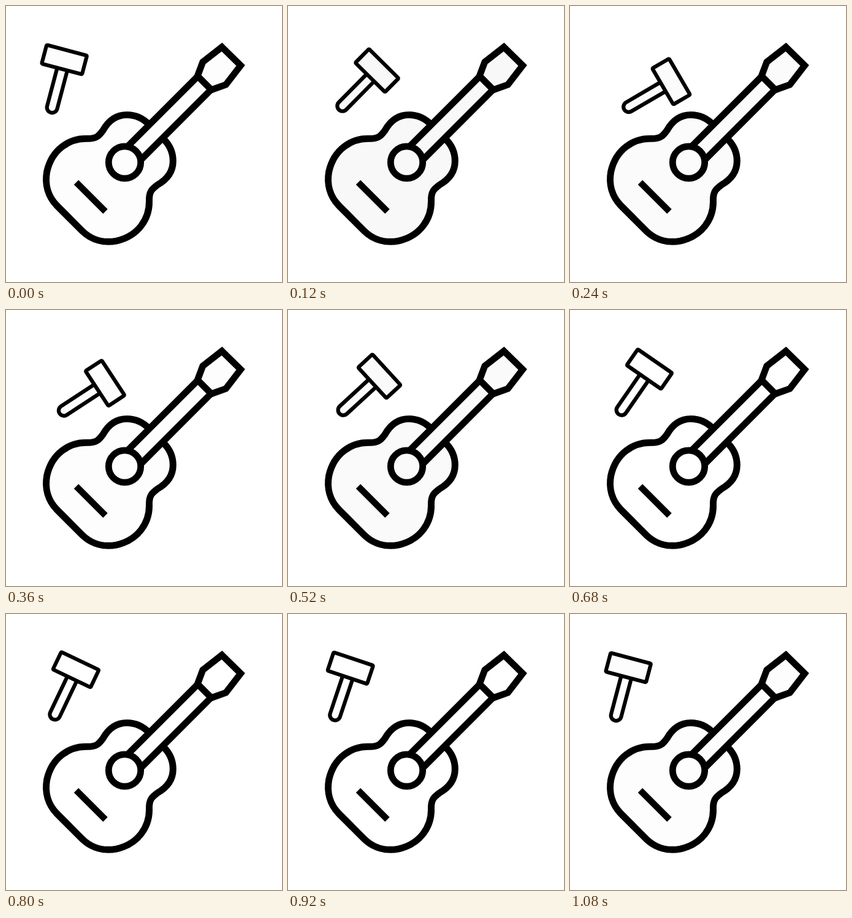
Recreate the animation shown at these times as an HTML page. Size 450x450 px, loop 1120 ms.

```html
<!DOCTYPE html>
<html lang="en">
<head>
<meta charset="utf-8">
<title>Guitar and hammer</title>
<style>
  html, body { margin: 0; width: 100%; height: 100%; overflow: hidden; background: #fff; }
  svg { display: block; width: 100vw; height: 100vh; }
</style>
</head>
<body>
<svg viewBox="0 0 450 450">
  <defs>
    <path id="side" d="M104 346.5L83 325.5C68 310 63 290 66.7 270C75 233 104 216 131 216.3
      C148 217 152 211 158 203C167 187 180 177.5 197 177.5C211 177.5 224 183.5 234 194L255 195.5Z"/>
    <path id="rim" d="M103 345.5L83 325.5C68 310 63 290 66.7 270C75 233 104 216 131 216.3
      C148 217 152 211 158 203C167 187 180 177.5 197 177.5C211 177.5 224 183.5 234 194"/>
  </defs>
  <g id="art" fill="#fdfdfd" stroke="#000" stroke-width="10.8">
    <!-- the body mirrors across the neck axis x + y = 449.8 -->
    <g stroke="none">
      <use href="#side"/>
      <use href="#side" transform="matrix(0 -1 -1 0 449.8 449.8)"/>
    </g>
    <g fill="none" stroke-linecap="round" stroke-width="11">
      <use href="#rim"/>
      <use href="#rim" transform="matrix(0 -1 -1 0 449.8 449.8)"/>
    </g>
    <path d="M193 234.3L312.9 114.4L334.6 136.1L214.7 256Z"/>
    <path d="M312.3 114L320.8 91.3L352 67L382.6 97L358.5 128.3L335 136.7Z"/>
    <circle cx="193.5" cy="255" r="26.2"/>
    <path d="M114.5 287.5L162 335" stroke-width="10.5"/>
    <g id="hammer" stroke-width="6.2" stroke-linejoin="round">
      <path d="M-7.4 12V81A8.5 8.5 0 0 0 9.6 81V12Z"/>
      <rect x="-33.6" y="-15.4" width="68" height="31.6" rx="1.5"/>
    </g>
  </g>
</svg>
<script>
  const STEP = 40, FRAMES = 28, LAST = FRAMES - 1;
  const REST = 14.8, SWING = 45, PEAK = 5.4;
  // [step, grey level] of the fill
  const shades = [[0, 253], [3, 248], [9, 253], [13, 250], [17, 255], [23, 255], [27, 253]];
  const art = document.getElementById('art');
  const hammer = document.getElementById('hammer');

  const ease = u => (1 - Math.cos(Math.PI * u)) / 2;

  function angleAt(n) {
    const lift = n < PEAK
      ? ease(Math.pow(n / PEAK, 0.85))
      : ease((LAST - n) / (LAST - PEAK));
    return REST + SWING * lift;
  }

  function shadeAt(n) {
    const i = Math.max(1, shades.findIndex(([step]) => step >= n));
    const [a, from] = shades[i - 1], [b, to] = shades[i];
    return Math.round(from + (to - from) * (n - a) / (b - a));
  }

  function draw(now) {
    const n = Math.floor(now / STEP) % FRAMES;
    const grey = shadeAt(n);
    art.setAttribute('fill', `rgb(${grey},${grey},${grey})`);
    hammer.setAttribute('transform',
      `translate(86.8 189.8) rotate(${angleAt(n).toFixed(2)}) translate(-18.5 -101.5)`);
  }

  const start = performance.now();
  function tick() {
    draw(performance.now() - start);
    requestAnimationFrame(tick);
  }
  draw(0);
  requestAnimationFrame(tick);
</script>
</body>
</html>
```
